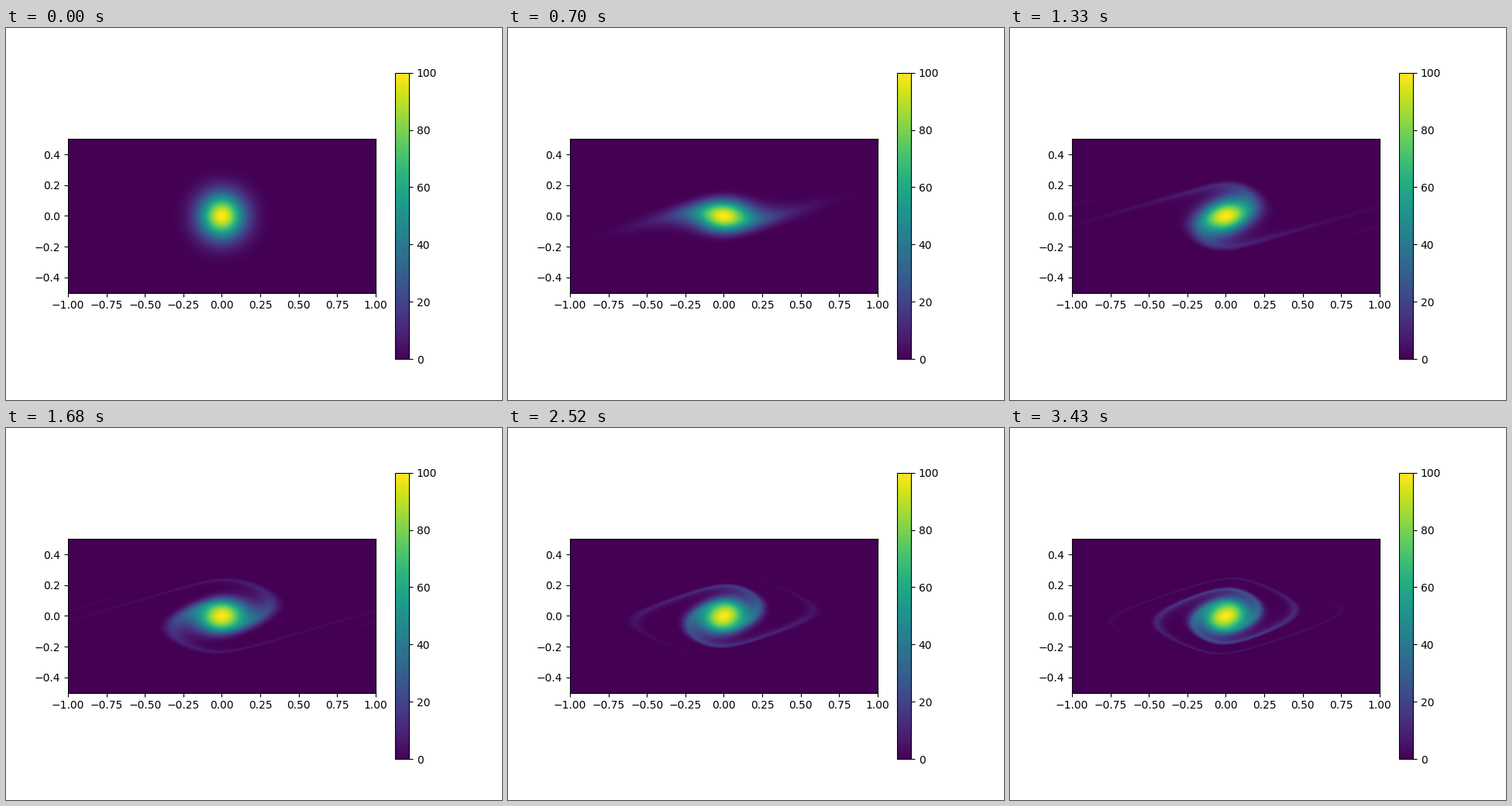
Animation of 640x480 px, one loop 3500 ms. Source, as a matplotlib script:

```python
import numpy as np
import matplotlib.pyplot as plt
from matplotlib.animation import FuncAnimation

FRAMES = 50
INTERVAL = 70
NX, NV = 2048, 1024      # phase-space lattice
DT = 0.4                 # time step per frame
SIGMA = 0.1              # initial spread in x and v
PEAK = 100
GRAVITY = 0.1            # pull far from the whole mass

x = (np.arange(NX) + 0.5) * 2 / NX - 1
v = (np.arange(NV) + 0.5) / NV - 0.5
cols = np.arange(NX)[None, :]
rows = np.arange(NV)[:, None]
drift = np.rint(v * DT * NX / 2).astype(int)
drift_index = (cols - drift[:, None]) % NX


def acceleration(f):
    """Self-gravity of a periodic 1D mass distribution."""
    rho = f.sum(axis=0, dtype=float)
    rho /= rho.sum()
    enclosed = np.cumsum(rho) - rho / 2
    a = -GRAVITY * (2 * enclosed - 1 - x)
    return a - a.mean()


def step(f):
    """Kick in v, then drift in x, by whole lattice cells."""
    kick = np.rint(acceleration(f) * DT * NV).astype(int)
    f = np.take_along_axis(f, (rows - kick[None, :]) % NV, axis=0)
    return np.take_along_axis(f, drift_index, axis=1)


def halve(f):
    return f.reshape(NV // 2, 2, NX // 2, 2).mean(axis=(1, 3))


def simulate():
    r2 = x[None, :] ** 2 + v[:, None] ** 2
    f = (PEAK * np.exp(-r2 / (2 * SIGMA ** 2))).astype(np.float32)
    states = [halve(f)]
    for _ in range(FRAMES - 1):
        f = step(f)
        states.append(halve(f))
    return states


states = simulate()

fig, ax = plt.subplots(figsize=(6.4, 4.8), dpi=100)
image = ax.imshow(states[0], origin="lower", extent=(-1, 1, -0.5, 0.5),
                  cmap="viridis", vmin=0, vmax=PEAK)
fig.colorbar(image, ax=ax)


def update(i):
    image.set_data(states[i % FRAMES])
    return [image]


anim = FuncAnimation(fig, update, frames=FRAMES, interval=INTERVAL,
                     repeat=True, repeat_delay=0)
plt.show()
```
